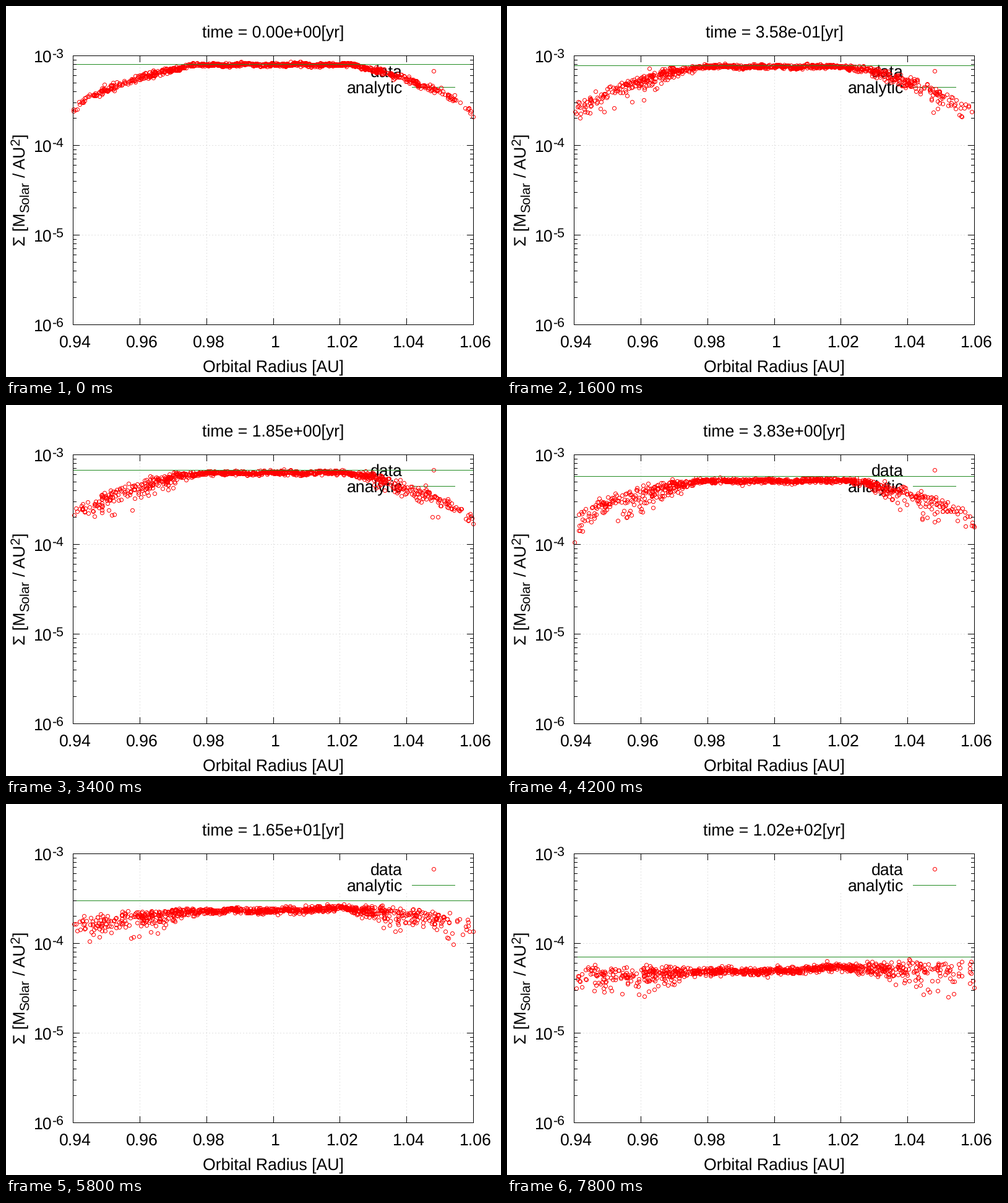
A matplotlib script that plays this animation: 800x600 px, repeating every 8 s.

```python
import numpy as np
import matplotlib.pyplot as plt
from matplotlib.animation import FuncAnimation

W, H, DPI = 800, 600, 100
PX = 72 / DPI                       # points per pixel
LEFT, RIGHT, TOP, BOTTOM = 108.5, 755.5, 80.5, 515.5
DECADE = (BOTTOM - TOP) / 3
FRAMES, STEP = 40, 200
BIG, SMALL = 26.67 * PX, 21.33 * PX
RED, GREEN = "#ff0000", "#228b22"

plt.rcParams["font.family"] = "Liberation Sans"
plt.rcParams["text.hinting"] = "none"

fig = plt.figure(figsize=(W / DPI, H / DPI), dpi=DPI, facecolor="white")
ax = fig.add_axes([0, 0, 1, 1])
ax.set_xlim(0, W)
ax.set_ylim(H, 0)
ax.axis("off")


def crisp(v):
    """Nearest pixel centre."""
    return np.round(np.asarray(v) - 0.5) + 0.5


def line(xs, ys, color="black", z=5, **kw):
    return ax.plot(crisp(xs), crisp(ys), color=color, lw=PX, zorder=z,
                   snap=False, solid_capstyle="projecting",
                   dash_capstyle="butt", **kw)[0]


def label(x, y, s, size=BIG, ha="center", rot=0):
    return ax.text(x, y, s, fontsize=size, ha=ha, va="baseline",
                   rotation=rot, rotation_mode="anchor", zorder=2)


def circles(xs, ys):
    return ax.plot(xs, ys, "o", mfc="none", mec=RED, mew=PX,
                   ms=6 * PX, snap=False, zorder=3)[0]


def to_x(au):
    return LEFT + (au - 0.94) / 0.12 * (RIGHT - LEFT)


def to_y(sigma):
    return TOP - DECADE * np.log10(sigma / 1e-3)


# Grid, leaving the legend area free
DOTS = dict(color="#c4c4c4", z=1, linestyle=(0, (1, 4)))
for au in (0.96, 0.98, 1.0, 1.02, 1.04):
    x = to_x(au)
    start = 145 if x > 500 else TOP
    line([x, x], [BOTTOM, start], **DOTS)
for k in (1, 2):
    y = TOP + k * DECADE
    line([LEFT, RIGHT], [y, y], **DOTS)

# Frame, ticks and tick labels
line([LEFT, RIGHT, RIGHT, LEFT, LEFT], [TOP, TOP, BOTTOM, BOTTOM, TOP])
for au in (0.94, 0.96, 0.98, 1, 1.02, 1.04, 1.06):
    x = to_x(au)
    line([x, x], [BOTTOM, BOTTOM - 10])
    line([x, x], [TOP, TOP + 10])
    label(x + 3.7, 552.5, f"{au:g}")
for power in (-3, -4, -5, -6):
    base = to_y(10.0 ** power)
    label(74.5, base + 11, "10", ha="right")
    label(74.5, base + 3, str(power), SMALL, "left")
    for m in range(1, 10):
        y = to_y(m * 10.0 ** power)
        if y < TOP - 1:
            continue
        size = 10 if m == 1 else 5
        line([LEFT, LEFT + size], [y, y])
        line([RIGHT, RIGHT - size], [y, y])

# Axis titles
label(432, 592.5, "Orbital Radius [AU]")
for x, y, s, size in ((31, 388, "Σ [M", BIG), (37, 334.5, "Solar", SMALL),
                      (31, 277.3, "/ AU", BIG), (21.5, 225.4, "2", SMALL),
                      (31, 213.5, "]", BIG)):
    label(x, y, s, size, "left", 90)

# Legend
label(641, 115, "data", ha="right")
label(641, 141, "analytic", ha="right")
circles([691.2], [104.5])
line([656.5, 725.5], [131.5, 131.5], GREEN, 2)

title = label(432, 51.5, "")
points = circles([], [])
curve = line([LEFT, RIGHT], [TOP, TOP], GREEN, 4)


def edge(x):
    """Drop in pixels of the density towards the rim of the ring."""
    off = (x - 432) / 324
    u = np.abs(off)
    rim = np.clip((u - 0.35) / 0.65, 0, None) ** 1.5
    return np.where(off > 0, 71, 64) * rim + 12 * u ** 30


# Ring particles on slightly eccentric orbits
N = 960
rng = np.random.default_rng(7)
grid = np.linspace(0.936, 1.064, 600)
cdf = np.cumsum(10 ** (-1.1 * edge(to_x(grid)) / DECADE))
axis = np.interp(rng.random(N), cdf / cdf[-1], grid)
ecc = np.abs(rng.normal(0, 0.004, N))
phase = rng.uniform(0, 2 * np.pi, N)


def year(i):
    return 0.1 * 1.2 ** (i - 1) if i else 0.0


def analytic(t):
    return to_y(8e-4 / (1 + t / 9.9))


def particles(i, t):
    noise = np.random.default_rng(100 + i)
    x = to_x(axis - ecc * np.cos(2 * np.pi * t * axis ** -1.5 + phase))
    u = np.abs(x - 432) / 324
    rim = np.clip((u - 0.35) / 0.3, 0, 1)
    stir = 1 - np.exp(-t / 0.08)
    late = t / (t + 12)

    y = analytic(t) + 21 * t / (t + 8)
    y = y + edge(x) / (1 + (t / 11) ** 1.8)
    y -= 4 * np.tanh((x - 480) / 30) * t / (t + 20)
    y += 0.8 * np.sin(x / 13 + 2 * i) + 0.6 * np.sin(x / 7 - i)
    y += noise.normal(0, 1.4 + 1.7 * late, N)
    y += rim * noise.normal(0, 2.5 + stir, N)
    tail = noise.exponential(7.5 + 4 * late, N).clip(0, 38)
    y += rim * stir * (tail - 4)

    keep = (x >= LEFT) & (x <= RIGHT)
    return x[keep], y[keep]


def update(i):
    t = year(i)
    title.set_text(f"time = {t:.2e}[yr]")
    points.set_data(*particles(i, t))
    curve.set_ydata(crisp([analytic(t)] * 2))
    return title, points, curve


anim = FuncAnimation(fig, update, frames=FRAMES, interval=STEP,
                     init_func=lambda: update(0), repeat=True,
                     repeat_delay=0, blit=False)
plt.show()
```
